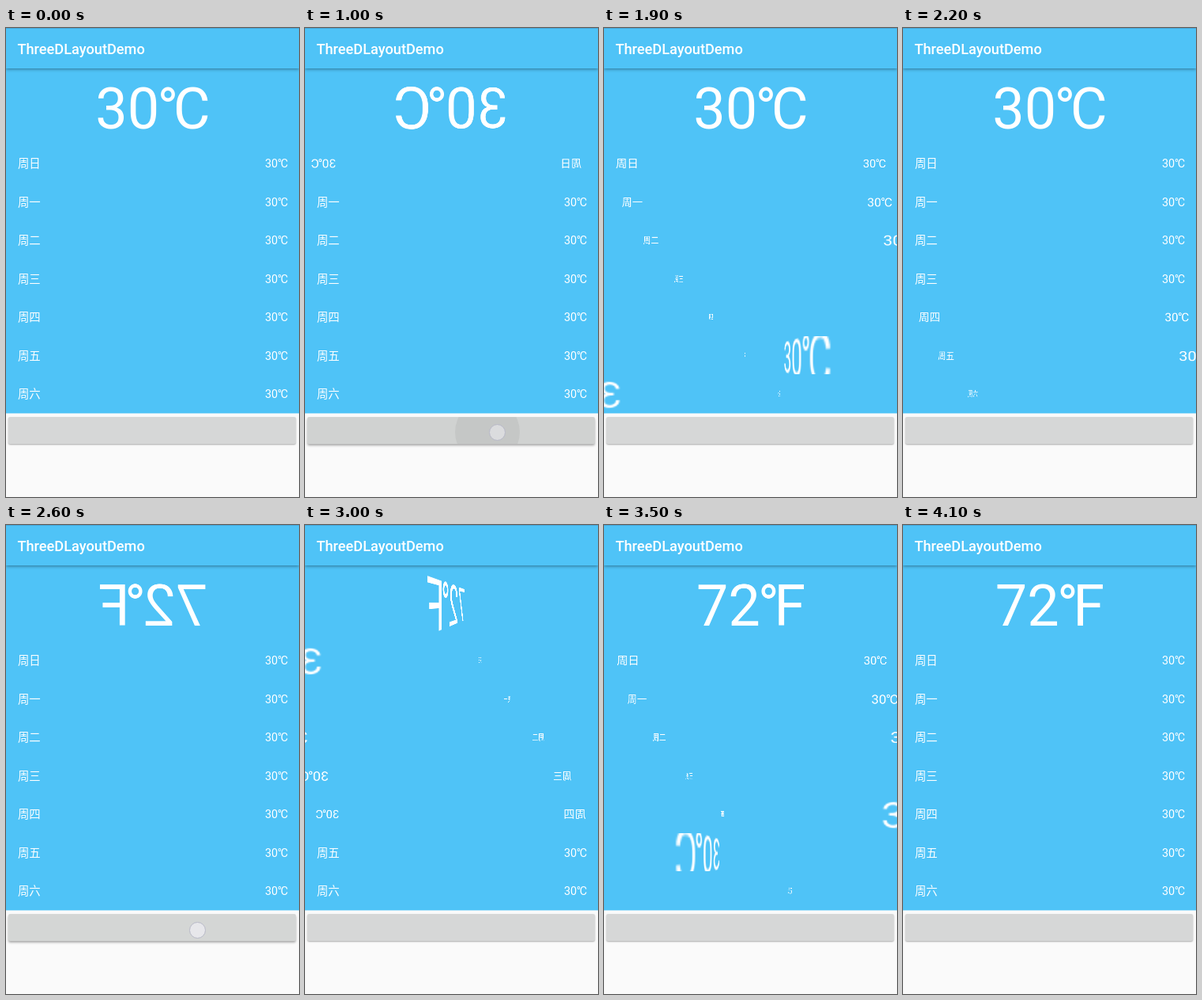
These frames come from a looping animation (371x592 px, 4.3 s). An HTML page:

```html
<!DOCTYPE html>
<html lang="zh-CN">
<head>
<meta charset="utf-8">
<title>ThreeDLayoutDemo</title>
<style>
  html, body { margin: 0; width: 100%; height: 100%; overflow: hidden; background: #fafafa; }
  body { position: relative; color: #fff; font-family: Roboto, "Noto Sans CJK SC", "Noto Sans CJK", sans-serif; }
  div { position: absolute; box-sizing: border-box; white-space: nowrap; }
  #bar {
    left: 0; top: 0; width: 371px; height: 51px; z-index: 2; padding-left: 14.4px;
    background: #4fc3f7; border-top: 1px solid #45a9dc; box-shadow: 0 1px 4px rgba(0, 0, 0, .42);
    font-size: 18.2px; font-weight: 500; line-height: 51px;
  }
  #panel {
    left: 0; top: 51px; width: 371px; height: 435px; overflow: hidden;
    background: #4fc3f7; box-shadow: 0 1px rgba(79, 195, 247, .4);
  }
  .slot { left: 0; width: 371px; overflow: hidden; }
  /* Faces are laid out at double size so that text stays solid when magnified */
  .face { left: -50%; top: -50%; width: 200%; height: 200%; transform: scale(.5); }
  .turning { will-change: transform; }
  .face div { top: 2.2px; line-height: 96.88px; font-size: 28.8px; }
  .face .day { left: 28.8px; }
  .face .temp { right: 28.8px; }
  .face .big { left: 0; top: 7px; width: 100%; text-align: center; font-size: 144px; line-height: 191px; }
  .deg { margin: 0 -.09em 0 -.04em; }
  #button { left: 3px; top: 491px; width: 364px; height: 34px; border-radius: 2px; }
  #clip { left: 0; top: 0; width: 100%; height: 100%; border-radius: 2px; overflow: hidden; }
  #ripple { left: 186.5px; top: -22px; width: 82px; height: 82px; border-radius: 50%; background: #c5c7c6; }
  #dot { width: 21px; height: 21px; border-radius: 50%; border: 1.5px solid #b8b9c8; }
</style>
</head>
<body>
<div id="bar">ThreeDLayoutDemo</div>
<div id="panel"></div>
<div id="button"><div id="clip"><div id="ripple"></div></div></div>
<div id="dot"></div>
<script>
const LOOP = 4300, STEP = 100, LENS = 198;
const HEAD = 95.6, ROW = 48.44;
// [time, progress of the header]; each row follows a tenth later
const SPINS = [
  [[905, 0], [1000, .097], [1900, 1.017], [2500, 1.65]],
  [[2600, .004], [3000, .435], [3500, .984], [4100, 1.645]]
];
const $ = id => document.getElementById(id);
const degrees = (n, unit) => `${n}<span class="deg">°</span>${unit}`;

function addFace(top, height, html) {
  const slot = document.createElement('div');
  slot.className = 'slot';
  slot.style.top = top + 'px';
  slot.style.height = height + 'px';
  slot.innerHTML = `<div class="face">${html}</div>`;
  $('panel').append(slot);
  return slot.firstChild;
}

const head = addFace(0, HEAD, '<div class="big"></div>');
const faces = [head, ...[...'日一二三四五六'].map((day, i) =>
  addFace(HEAD + i * ROW, ROW,
    `<div class="day">周${day}</div><div class="temp">${degrees(30, 'C')}</div>`))];
const delays = faces.map((_, i) => i < 2 ? i * .018 : (i - 1) * .1);

function along(points, t) {
  let k = 1;
  while (k < points.length - 1 && t > points[k][0]) k++;
  const [t0, p0] = points[k - 1], [t1, p1] = points[k];
  return p0 + (p1 - p0) * (t - t0) / (t1 - t0);
}

// Half a turn with a cosine ease, starting from the mirrored side
const turn = p => p < 0 || p >= 1 ? 0 : 90 * (1 + Math.cos(Math.PI * p));

let shown = '';
function setHead(text) {
  if (text !== shown) head.firstChild.innerHTML = shown = text;
}

function draw(t) {
  const second = t >= 2600;
  const p = along(SPINS[second ? 1 : 0], t);
  setHead(second ? degrees(72, 'F') : degrees(30, 'C'));
  faces.forEach((face, i) => {
    const angle = turn(p - delays[i]);
    face.classList.toggle('turning', angle > 0);
    face.style.transform = angle ? `perspective(${LENS}px) rotateY(${-angle}deg) scale(.5)` : '';
  });

  const firstTap = t >= 700 && t < 1100, secondTap = t >= 2500 && t < 2700;
  const rippling = t >= 1000 && t < 1100;
  const button = $('button').style, dot = $('dot').style;
  button.background = rippling ? '#d0d2d1' : secondTap ? '#d4d6d5' : '#d6d7d7';
  button.boxShadow = firstTap || secondTap ? '0 2px 3px rgba(0,0,0,.32)' : '0 1px 2px rgba(0,0,0,.32)';
  $('ripple').style.display = rippling ? 'block' : 'none';
  dot.display = firstTap || secondTap ? 'block' : 'none';
  dot.background = `rgba(234, 234, 238, ${rippling ? .6 : .85})`;
  dot.left = (firstTap ? 233 : 232) + 'px';
  dot.top = (firstTap ? 499.5 : 500.5) + 'px';
}

const start = performance.now();
function tick() {
  const t = (performance.now() - start) % LOOP;
  draw(Math.floor(t / STEP) * STEP);
  requestAnimationFrame(tick);
}
tick();
</script>
</body>
</html>
```
